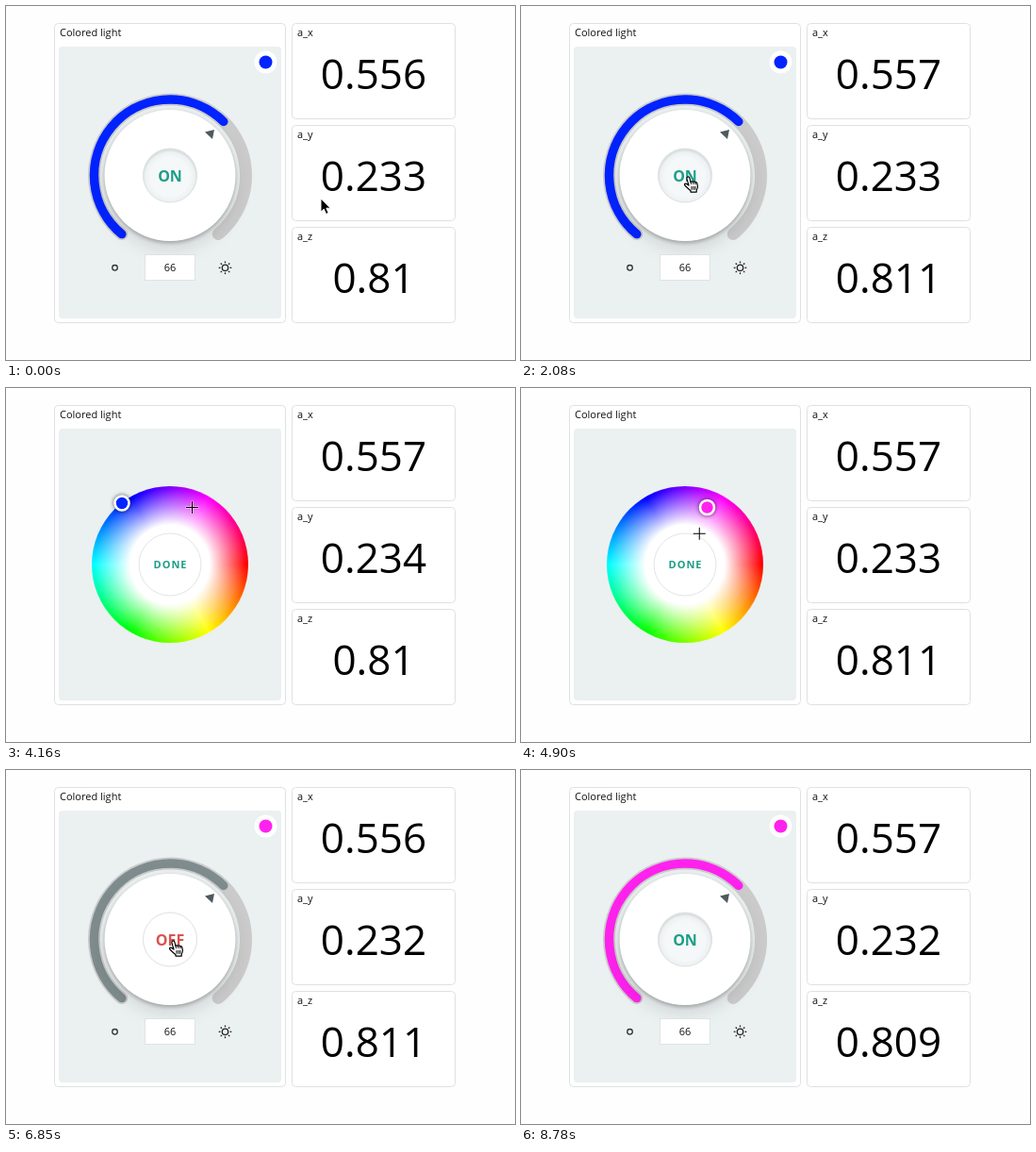
Animation of 540 by 375 pixels, one loop 8.88 s. Source, as an HTML page:

```html
<!DOCTYPE html>
<html lang="en">
<head>
<meta charset="utf-8">
<title>Light control</title>
<style>
  html, body { margin: 0; width: 100%; height: 100%; overflow: hidden; background: #fefefe; }
  svg { display: block; width: 540px; height: 375px; }
  text { font: 11px "Open Sans", sans-serif; fill: #111; }
  .mid { text-anchor: middle; }
  .value { font-size: 44px; fill: #000; }
  .card { fill: #fff; stroke: #dfe1e1; }
  .power { font-size: 16px; font-weight: 700; }
  .done { font-weight: 700; letter-spacing: 1px; fill: #1f9d88; }
  .arc { fill: none; stroke-linecap: round; }
  .knob { fill: #fff; filter: drop-shadow(0 2px 2px #0004) drop-shadow(0 8px 9px #0000001c); }
  .handle { stroke: #fff; stroke-width: 2.6; filter: drop-shadow(0 0 2px #000a); }
  .hue {
    width: 166px; height: 166px; border-radius: 50%;
    background:
      radial-gradient(circle, #fff 42px, #fff0 81px),
      conic-gradient(from 90deg, #f00, #ff0, #0f0, #0ff, #00f, #f0f, #f00);
  }
</style>
</head>
<body>
<svg viewBox="0 0 540 375">
  <defs>
    <radialGradient id="dent" cy=".53">
      <stop offset=".72" stop-color="#f5f8f8"/>
      <stop offset=".92" stop-color="#edf1f1"/>
      <stop offset="1" stop-color="#d9dfdf"/>
    </radialGradient>
  </defs>

  <rect class="card" x="51.5" y="18.5" width="245" height="317" rx="4"/>
  <text x="57" y="32">Colored light</text>
  <rect x="56" y="43" width="236" height="288" rx="4" fill="#ebf0f0"/>
  <g id="cards"></g>

  <g id="dial">
    <circle cx="275.5" cy="59.5" r="12" fill="#fff"/>
    <circle id="swatch" cx="275.5" cy="59.5" r="7"/>
    <g transform="translate(174 179.5)">
      <g transform="rotate(129.5)">
        <circle class="arc" r="80.5" pathLength="360" stroke="#cbcbcb" stroke-width="13" stroke-dasharray="281 360"/>
        <circle class="arc" id="level" r="80.5" pathLength="360" stroke-width="9.5" stroke-dasharray="185.5 360"/>
      </g>
      <circle class="knob" r="69.5"/>
      <path d="M37 -46 L47 -48.5 L45 -38.5Z" fill="#4d5a5f"/>
      <circle id="button" r="28.5" stroke="#dde1e1"/>
      <text id="power" class="mid power" y="6.5"></text>
    </g>
    <circle cx="115.5" cy="277.3" r="2.8" fill="none" stroke="#333" stroke-width="1.3"/>
    <rect x="147.5" y="263.5" width="53" height="27" fill="#fff" stroke="#dfe3e3"/>
    <text class="mid" x="174" y="281">66</text>
    <g id="sun" transform="translate(232.5 277.3)" fill="none" stroke="#222" stroke-width="1.3">
      <circle r="3.2"/>
    </g>
  </g>

  <g id="wheel">
    <foreignObject x="91" y="104" width="166" height="166"><div class="hue"></div></foreignObject>
    <circle cx="174" cy="187" r="33" fill="#fff" stroke="#e2e4e4"/>
    <text class="mid done" x="174.5" y="191">DONE</text>
    <circle id="handle" class="handle" r="7.5"/>
  </g>

  <g id="cursor">
    <path id="arrow" d="M0 0V14.2L3.3 11.2L5.6 16.4L8.2 15.3L5.9 10.2H10.3Z" fill="#000" stroke="#fff"/>
    <g id="hand" transform="translate(-4.6 -1.1)" stroke="#000" stroke-linejoin="round" stroke-linecap="round">
      <path fill="#fff" stroke-width="1.2" d="M5.6 10.2L3.6 3.2Q3.2 1.4 4.6 1.1Q6 .8 6.5 2.4L7.6 6.4Q9 5.3 10 6.5Q11.4 5.5 12.3 6.8Q14 6.2 14.4 8L15 11Q15.2 13.5 13.8 15.2V17.2H7.6V15.8Q5.5 14 3.2 11.8Q.2 9.3 1.4 8.4Q3 7.6 5.6 10.2Z"/>
      <path fill="none" d="M7.6 6.4L8.2 8.6M10 6.5L10.5 8.6M12.3 6.8L12.7 8.8M8.6 11.5V14.5M10.6 11.5V14.5M12.5 11.5V14.5"/>
    </g>
    <g id="cross" fill="none">
      <path d="M-7 0H7M0 -7V7" stroke="#fff8" stroke-width="2.6"/>
      <path d="M-6.5 0H6.5M0 -6.5V6.5" stroke="#000"/>
    </g>
  </g>
</svg>

<script>
const LOOP = 8880, TICK = 148.8, LEAD = 12;
const BLUE = '#0023ff', PINK = '#ff22ee', GREY = '#7f8c8d';
const $ = id => document.getElementById(id);

// Ticks at which the interface reacts to clicks
const OPEN = 21, PICK = 29, CLOSE = 36;
const isOff = n => (n >= 8 && n < 14) || (n >= 44 && n < 48);

// Cursor moves: first tick, last tick, x, y
const START = [334, 204];
const MOVES = [
  [1, 7, 169, 181], [11, 12, 177, 181],
  [15, 18, 275, 53], [19, 19, 277, 59],
  [22, 28, 197.5, 126.5], [32, 35, 181, 182],
  [39, 42, 177, 181], [51, 57, 492, 384]
];

// Sensor readings: tick, then the three values
const READINGS = [
  [0, '0.556', '0.233', '0.81'], [2, '0.557', '0.233', '0.811'],
  [6, '0.556', '0.232', '0.811'], [9, '0.557', '0.233', '0.811'],
  [11, '0.556', '0.233', '0.811'], [12, '0.557', '0.233', '0.811'],
  [16, '0.557', '0.233', '0.81'], [18, '0.556', '0.234', '0.811'],
  [21, '0.557', '0.233', '0.811'], [24, '0.556', '0.233', '0.81'],
  [26, '0.557', '0.234', '0.81'], [29, '0.556', '0.234', '0.81'],
  [30, '0.556', '0.233', '0.81'], [33, '0.557', '0.233', '0.811'],
  [35, '0.556', '0.233', '0.811'], [39, '0.557', '0.234', '0.811'],
  [42, '0.556', '0.233', '0.811'], [46, '0.556', '0.232', '0.811'],
  [48, '0.557', '0.232', '0.81'], [52, '0.556', '0.233', '0.811'],
  [55, '0.557', '0.233', '0.81'], [59, '0.557', '0.232', '0.809']
];

$('cards').innerHTML = ['a_x', 'a_y', 'a_z'].map((name, i) => `
  <g transform="translate(0 ${108 * i})">
    <rect class="card" x="303.5" y="18.5" width="173" height="101" rx="4"/>
    <text x="309" y="32">${name}</text>
    <text class="mid value" x="390" y="88"></text>
  </g>`).join('');
const values = document.querySelectorAll('.value');

for (let a = 0; a < 360; a += 45) {
  $('sun').insertAdjacentHTML('beforeend', `<path d="M5 0H6.8" transform="rotate(${a})"/>`);
}

const ease = p => p * p * (3 - 2 * p);
const show = (id, on) => { $(id).style.display = on ? '' : 'none'; };
const place = (id, [x, y]) => $(id).setAttribute('transform', `translate(${x} ${y})`);

function cursorAt(n) {
  let [x, y] = START;
  for (const [first, last, toX, toY] of MOVES) {
    if (n < first) break;
    const p = ease(Math.min(1, (n - first + 1) / (last - first + 1)));
    x += (toX - x) * p;
    y += (toY - y) * p;
  }
  return [x, y];
}

function cursorKind(n, [x, y]) {
  const within = (cx, cy, r) => Math.hypot(x - cx, y - cy) < r;
  // The pointer shape lags one tick behind a change of view
  if (n > OPEN && n <= CLOSE) {
    if (within(174, 187, 33)) return 'hand';
    return within(174, 187, 83) ? 'cross' : 'arrow';
  }
  return within(174, 179.5, 29) || within(275.5, 59.5, 13) ? 'hand' : 'arrow';
}

function draw(n) {
  const color = n < PICK ? BLUE : PINK;
  const off = isOff(n), picking = n >= OPEN && n < CLOSE;

  show('dial', !picking);
  show('wheel', picking);
  $('swatch').setAttribute('fill', color);
  $('level').setAttribute('stroke', off ? GREY : color);
  $('button').setAttribute('fill', off ? '#fff' : 'url(#dent)');
  $('power').textContent = off ? 'OFF' : 'ON';
  $('power').style.fill = off ? '#d9534f' : '#1f9d88';
  $('handle').setAttribute('fill', color);
  place('handle', n < PICK ? [123, 122] : [197.5, 126.5]);

  const reading = READINGS.findLast(r => r[0] <= n);
  values.forEach((el, i) => { el.textContent = reading[i + 1]; });

  const at = cursorAt(n), kind = cursorKind(n, at);
  place('cursor', at);
  for (const id of ['arrow', 'hand', 'cross']) show(id, id === kind);
}

const begin = performance.now();
let shown = -1;
function frame() {
  const t = (performance.now() - begin) % LOOP;
  const n = Math.min(59, Math.floor((t + LEAD) / TICK));
  if (n !== shown) draw(shown = n);
  requestAnimationFrame(frame);
}
frame();
</script>
</body>
</html>
```
